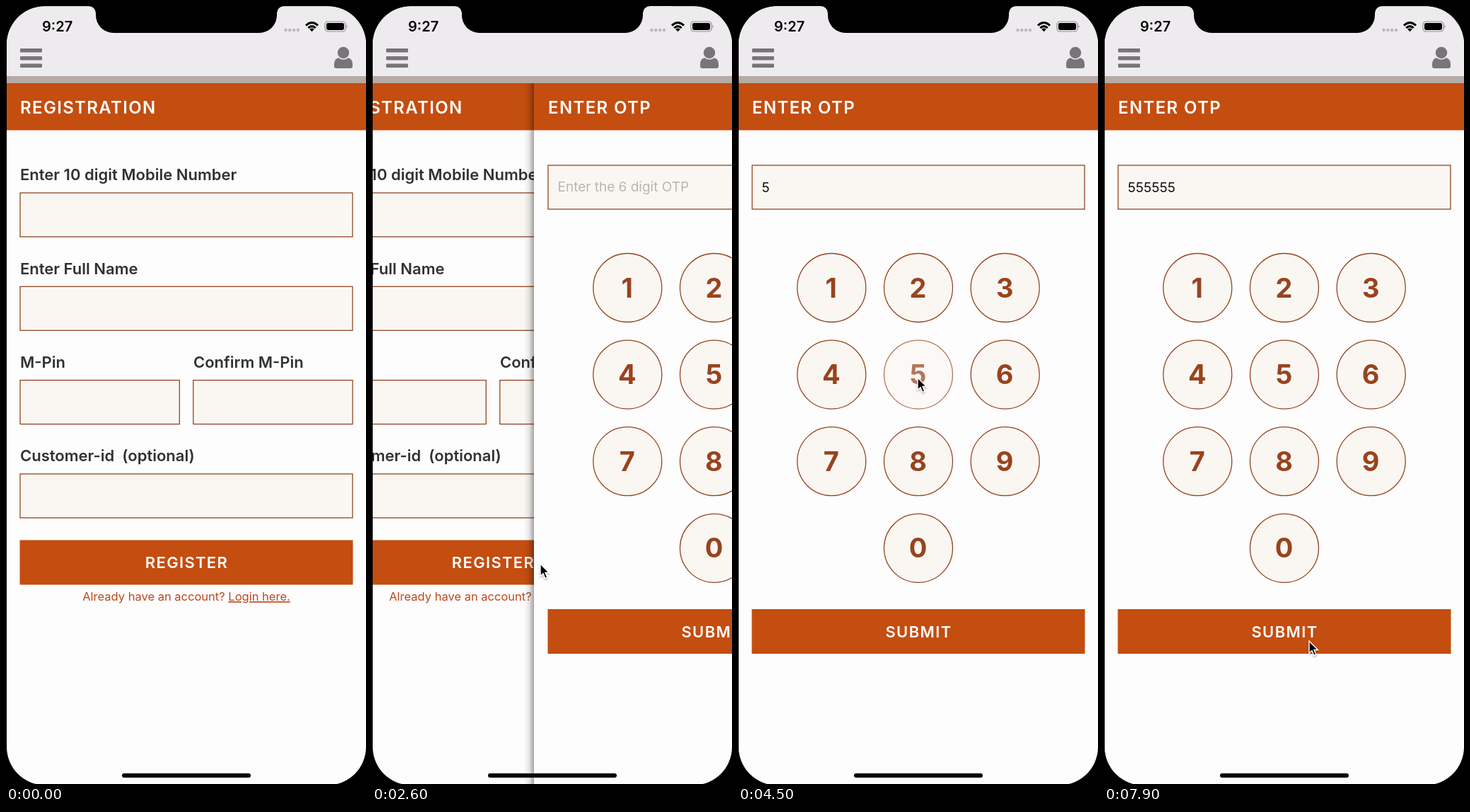
An HTML page that plays this animation: 509 px wide and 1099 px high, repeating every 8000 ms.

```html
<!DOCTYPE html>
<html lang="en">
<head>
<meta charset="utf-8">
<title>Registration flow</title>
<style>
  html, body { margin: 0; width: 100%; height: 100%; overflow: hidden; background: #000; }
  svg { display: block; width: 509px; height: 1099px; }
  text { font-family: Inter, Roboto, sans-serif; white-space: pre; }
  .title { font-size: 24px; font-weight: 600; letter-spacing: 1.36px; fill: #fff; }
  .button { font-size: 22px; font-weight: 600; letter-spacing: 1.36px; fill: #fff; text-anchor: middle; }
  .label { font-size: 22px; font-weight: 600; fill: #333034; }
  .digit { font-size: 38px; font-weight: 700; fill: #99431e; text-anchor: middle; }
  .hint { font-size: 19px; fill: #b9b5b5; }
  .value { font-size: 19px; fill: #111; }
  .link { font-size: 16.5px; fill: #b9491a; text-anchor: middle; }
  .field { fill: #faf7f3; stroke: #93451f; stroke-width: 1.3; }
  .orange { fill: #c44d10; }
  .page { fill: #fefdfe; }
</style>
</head>
<body>
<svg viewBox="0 0 509 1099">
  <defs>
    <clipPath id="screen"><rect x="1" y="0.5" width="508" height="1100" rx="54"/></clipPath>
    <linearGradient id="edge">
      <stop offset="0" stop-opacity="0"/><stop offset=".5" stop-opacity=".09"/><stop offset="1" stop-opacity=".36"/>
    </linearGradient>
    <filter id="drop" x="-50%" y="-50%" width="200%" height="200%">
      <feDropShadow dx="0" dy="1.5" stdDeviation="1.2" flood-opacity=".35"/>
    </filter>
  </defs>
  <rect width="509" height="1099"/>
  <g clip-path="url(#screen)">
    <g id="register"></g>
    <g id="otp"></g>
    <rect width="509" height="99.5" fill="#edebed"/>
    <rect y="99" width="509" height="10" fill="#b6aca5"/>
    <g fill="#777577">
      <rect x="20" y="60" width="31" height="5.5" rx="1.2"/>
      <rect x="20" y="71" width="31" height="5.5" rx="1.2"/>
      <rect x="20" y="81.5" width="31" height="5.5" rx="1.2"/>
      <path d="M464 83Q464 73 472 73H482Q490 73 490 83V85Q490 88 487 88H467Q464 88 464 85Z"/>
      <circle cx="477" cy="66" r="9" stroke="#edebed" stroke-width="1.5"/>
    </g>
    <text x="51" y="36" font-size="20" font-weight="600">9:27</text>
    <path d="M395.5 34H414" stroke="#bab8ba" stroke-width="4.4" stroke-linecap="round" stroke-dasharray="0 5.8"/>
    <g fill="none" stroke="#000" stroke-width="3">
      <path d="M424 27.5Q432.5 19.5 441 27.5M427.3 31Q432.5 26.2 437.7 31"/>
    </g>
    <path d="M429.2 32.8Q432.5 30 435.8 32.8L432.5 36.2Z"/>
    <rect x="451" y="22" width="29" height="14" rx="4.2" fill="none" stroke="#8f8d8f" stroke-width="1.2"/>
    <rect x="453" y="24" width="25" height="10" rx="2.4"/>
    <path d="M481.5 26.5Q484 29 481.5 31.5Z" fill="#8f8d8f"/>
  </g>
  <path d="M117 0Q126 1 127 10V13A25 25 0 0 0 152 38H358A25 25 0 0 0 383 13V10Q384 1 393 0Z"/>
  <rect x="164" y="1084" width="182" height="6" rx="3"/>
  <g id="cursor">
    <circle id="ring" cx="0.5" cy="2" r="26.5" fill="none" stroke="#000" stroke-width="2"/>
    <path d="M0 0V17.2L4 13.6L6.8 20.4L9.8 19.1L7 12.5H12.4Z" stroke="#fff" stroke-width="1.4" filter="url(#drop)"/>
  </g>
</svg>
<script>
const LOOP = 8000, WIDTH = 509;
const $ = id => document.getElementById(id);
const text = (kind, x, y, words, extra = '') => `<text class="${kind}" x="${x}" y="${y}" ${extra}>${words}</text>`;
const field = (x, y, w = 470) => `<rect class="field" x="${x}" y="${y}" width="${w}" height="62"/>`;
const button = (id, y, words) =>
  `<g id="${id}"><rect class="orange" x="19.5" y="${y}" width="471" height="63"/>${text('button', 255.5, y + 39.8, words)}</g>`;
const page = title =>
  `<rect class="page" width="${WIDTH}" height="1100"/><rect class="orange" y="109" width="${WIDTH}" height="66.5"/>${text('title', 20, 151.5, title)}`;

const key = n => {
  const i = n ? n - 1 : 10;
  const x = 132.3 + i % 3 * 122.7, y = 398 + Math.floor(i / 3) * 122.6;
  return `<g id="key${n}"><circle class="field" cx="${x}" cy="${y}" r="48.5"/>${text('digit', x - 0.5, y + 13.5, n)}</g>`;
};

$('register').innerHTML = page('REGISTRATION') +
  text('label', 20, 246, 'Enter 10 digit Mobile Number') + field(20, 264) +
  text('label', 20, 378.5, 'Enter Full Name') + field(20, 396.3) +
  text('label', 20, 511, 'M-Pin') + field(20, 528.6, 225.3) +
  text('label', 265, 511, 'Confirm M-Pin') + field(264.8, 528.6, 225.3) +
  text('label', 20, 643, 'Customer-id  (optional)') + field(20, 661) +
  button('registerButton', 754.5, 'REGISTER') +
  text('link', 255, 840, 'Already have an account? <tspan text-decoration="underline">Login here.</tspan>');

$('otp').innerHTML = '<rect x="-14" y="109" width="14" height="990" fill="url(#edge)"/>' +
  page('ENTER OTP') + field(20, 225) +
  text('hint', 33.5, 262, 'Enter the 6 digit OTP', 'id="hint"') + text('value', 33.5, 263, '', 'id="value"') +
  [0, 1, 2, 3, 4, 5, 6, 7, 8, 9].map(key).join('') + button('submitButton', 852, 'SUBMIT');

// Cursor stops: time, x, y
const stops = [
  [1100, 34, 85], [1600, 376, 815], [1950, 238, 788], [3500, 238, 788],
  [4050, 254, 525], [7350, 254, 525], [7700, 292, 950], [7880, 290, 897], [LOOP, 290, 897]
];
const ease = p => p * p * (3 - 2 * p);
function cursorAt(t) {
  const i = Math.max(1, stops.findIndex(s => s[0] > t));
  const [t0, x0, y0] = stops[i - 1], [t1, x1, y1] = stops[i];
  const p = ease(Math.max(0, (t - t0) / (t1 - t0)));
  return [x0 + (x1 - x0) * p, y0 + (y1 - y0) * p];
}

const HOLD = 200, FADE = 250;
const registerPress = 2050;
const keyPresses = Array.from({ length: 6 }, (_, i) => 4150 + i * 500);
const presses = [registerPress, ...keyPresses];
const held = (t, start) => t >= start && t < start + HOLD;

// Dims at once on touch, then fades back after release
function pressOpacity(t, start) {
  const since = t - start;
  if (since < 0 || since >= HOLD + FADE) return 1;
  return 0.2 + 0.8 * ease(Math.max(0, (since - HOLD) / FADE));
}

// Critically damped spring; returns the part still to travel
function slideLeft(t) {
  const s = Math.max(0, t - 2500) / 1000 * Math.sqrt(1000 / 3);
  return Math.exp(-s) * (1 + s);
}

function draw() {
  const t = performance.now() % LOOP;
  const left = slideLeft(t);
  $('otp').setAttribute('transform', `translate(${left * WIDTH})`);
  $('otp').style.display = t > 2500 ? '' : 'none';
  $('register').setAttribute('transform', `translate(${-0.3 * WIDTH * (1 - left)})`);

  const typed = keyPresses.filter(start => t >= start + 100).length;
  $('value').textContent = '5'.repeat(typed);
  $('hint').style.display = typed ? 'none' : '';
  $('registerButton').style.opacity = pressOpacity(t, registerPress);
  $('key5').style.opacity = Math.min(...keyPresses.map(start => pressOpacity(t, start)));

  $('cursor').setAttribute('transform', `translate(${cursorAt(t)})`);
  $('cursor').style.display = t >= 1100 ? '' : 'none';
  $('ring').style.display = presses.some(start => held(t, start)) ? '' : 'none';
  requestAnimationFrame(draw);
}
draw();
</script>
</body>
</html>
```
